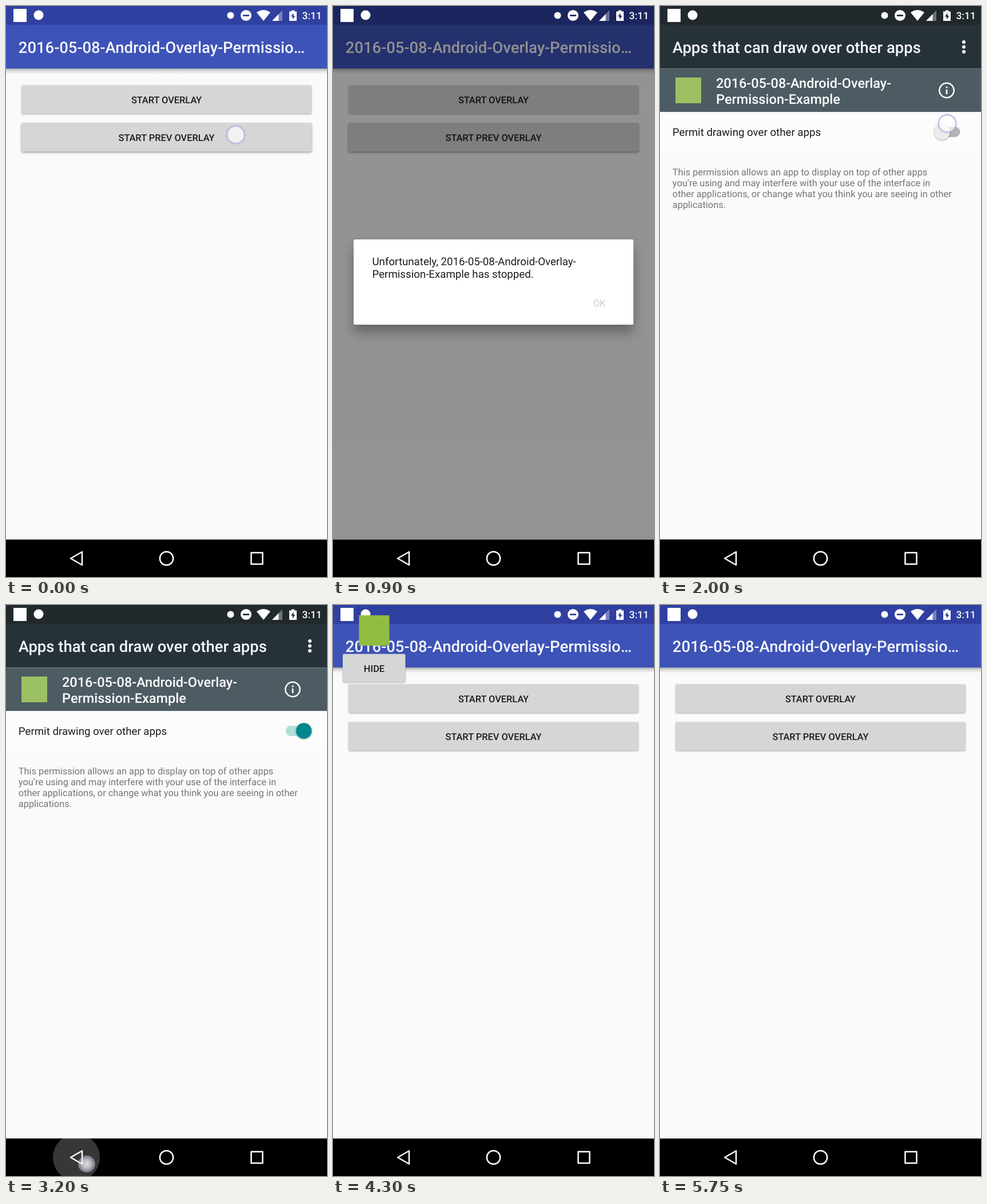
Recreate the animation shown at these times as an HTML page. Size 561 by 998 pixels, loop 5800 ms.

```html
<!DOCTYPE html>
<html lang="en">
<head>
<meta charset="utf-8">
<title>Overlay permission demo</title>
<style>
html, body { margin: 0; width: 100%; height: 100%; overflow: hidden; background: #000; }
svg { display: block; width: 561px; height: 998px; }
text { font-family: Roboto, sans-serif; white-space: pre; text-rendering: geometricPrecision; }
.title { font-size: 27.45px; font-weight: 500; fill: #f6f6fb; }
.head { font-size: 23.5px; font-weight: 500; fill: #fff; }
.label { font-size: 16.4px; font-weight: 500; fill: #1c1c1c; text-anchor: middle; }
.row { font-size: 18.7px; fill: #1d1d1d; }
.note { font-size: 16.36px; fill: #757575; }
.clock { font-size: 17.4px; font-weight: 500; fill: #fff; }
.button { fill: #d6d6d6; filter: drop-shadow(0 1px 1px rgba(0,0,0,.3)); }
.raised { fill: #d6d6d6; filter: drop-shadow(0 2px 2.5px rgba(0,0,0,.2)); }
.card { fill: #fff; filter: drop-shadow(0 14px 10px rgba(0,0,0,.3)); }
.knob { filter: drop-shadow(0 1px 1.5px rgba(0,0,0,.35)); }

/* One loop is 5.8 s, so 1% is 58 ms. */
.a { animation: 5.8s linear infinite both; }
.press { animation-name: press; }
.shade { animation-name: shade; }
.dialog { animation-name: dialog; transform-origin: 280.5px 482px; }
.settings { animation-name: settings; }
.slide { animation-name: slide; }
.on { animation-name: on; }
.ripple { animation-name: ripple; transform-origin: 123px 965.5px; }
.overlay { animation-name: overlay; }
.tap1 { animation-name: tap1; }
.tap2 { animation-name: tap2; }
.tap3 { animation-name: tap3; }
.tap4 { animation-name: tap4; }
.trail { animation-name: trail; }

@keyframes press {
  0%, 19.8% { opacity: 1; }
  19.81%, 100% { opacity: 0; }
}
@keyframes shade {
  0%, 10.3% { opacity: 0; }
  12.9%, 18.1% { opacity: .41; }
  20.3%, 26.4% { opacity: 0; }
  26.5%, 69.83% { opacity: .15; }
  72.4%, 100% { opacity: 0; }
}
@keyframes dialog {
  0%, 9.8% { opacity: 0; transform: scale(.9); }
  12.4%, 17.8% { opacity: 1; transform: none; }
  19.5%, 100% { opacity: 0; transform: none; }
}
@keyframes settings {
  0%, 24.66% { opacity: 0; transform: none; }
  26.4%, 68.8% { opacity: 1; transform: none; }
  69.83% { opacity: .8; transform: translateY(6px); }
  71.7%, 100% { opacity: 0; transform: translateY(60px); }
}
@keyframes slide {
  0%, 37.6% { transform: none; animation-timing-function: ease-in-out; }
  40.2%, 100% { transform: translateX(27.5px); }
}
@keyframes on {
  0%, 37.6% { opacity: 0; }
  40.2%, 100% { opacity: 1; }
}
@keyframes ripple {
  0%, 52.6% { opacity: 0; transform: scale(.1); }
  53.6% { opacity: .22; }
  55.17% { transform: scale(.56); }
  59.5% { transform: none; }
  62.9% { opacity: .2; }
  69.83% { opacity: .04; }
  72.4%, 100% { opacity: 0; transform: none; }
}
@keyframes overlay {
  0%, 68.1% { opacity: 0; }
  68.11%, 81.9% { opacity: 1; }
  81.91%, 100% { opacity: 0; }
}
@keyframes tap1 {
  0%, 5.2% { opacity: 1; }
  6.9%, 100% { opacity: 0; }
}
@keyframes tap2 {
  0%, 32.4% { opacity: 0; }
  33.4%, 39.7% { opacity: 1; }
  41.4%, 100% { opacity: 0; }
}
@keyframes tap3 {
  0%, 52.8% { opacity: 0; }
  53.6%, 60% { opacity: 1; }
  61.4%, 100% { opacity: 0; }
}
@keyframes tap4 {
  0%, 78.4% { opacity: 0; transform: translate(72px, 114px); }
  79.3%, 82.8% { opacity: 1; transform: translate(72px, 114px); }
  84.48% { opacity: 1; transform: translate(88px, 118px); }
  86.2%, 100% { opacity: 0; transform: translate(112px, 122px); }
}
@keyframes trail {
  0%, 83% { opacity: 0; }
  84%, 100% { opacity: .7; }
}
</style>
</head>
<body>
<svg viewBox="0 0 561 998">
  <defs>
    <linearGradient id="fall" x2="0" y2="1">
      <stop stop-opacity=".3"/>
      <stop offset=".4" stop-opacity=".12"/>
      <stop offset="1" stop-opacity="0"/>
    </linearGradient>
    <radialGradient id="halo">
      <stop offset=".74" stop-color="#8f93d0" stop-opacity="0"/>
      <stop offset=".82" stop-color="#8f93d0" stop-opacity=".35"/>
      <stop offset="1" stop-color="#8f93d0" stop-opacity="0"/>
    </radialGradient>
    <radialGradient id="glow">
      <stop stop-color="#fff" stop-opacity=".85"/>
      <stop offset=".5" stop-color="#f2f2f8" stop-opacity=".7"/>
      <stop offset="1" stop-color="#c4c6dc" stop-opacity=".45"/>
    </radialGradient>
    <clipPath id="navClip"><rect y="932.5" width="561" height="65.5"/></clipPath>
    <g id="cursor">
      <circle r="18.5" fill="url(#halo)"/>
      <circle r="15" fill="#fff" fill-opacity=".68" stroke="#b9bbe2" stroke-width="1.8"/>
    </g>
  </defs>

  <!-- Main screen -->
  <rect width="561" height="932.5" fill="#fafafa"/>
  <rect width="561" height="33" fill="#3040a0"/>
  <rect y="33" width="561" height="76.4" fill="#3d53b7"/>
  <rect y="109.4" width="561" height="10" fill="url(#fall)"/>
  <text class="title" x="21.8" y="81.7">2016-05-08-Android-Overlay-Permissio…</text>
  <rect class="button" x="27" y="138.5" width="507" height="50" rx="2.5"/>
  <rect class="button" x="27" y="204.5" width="507" height="50" rx="2.5"/>
  <rect class="raised a press" x="27" y="204.5" width="507" height="50" rx="2.5"/>
  <text class="label" x="280.5" y="170.2">START OVERLAY</text>
  <text class="label" x="280.5" y="235.8">START PREV OVERLAY</text>
  <rect class="a shade" width="561" height="932.5"/>

  <g class="a dialog">
    <rect class="card" x="36" y="408" width="489" height="149" rx="2.5"/>
    <text class="row" x="68.5" y="452.8">Unfortunately, 2016-05-08-Android-Overlay-</text>
    <text class="row" x="68.5" y="474.8">Permission-Example has stopped.</text>
    <text class="label" x="465.5" y="525" style="fill:#d6d6d6">OK</text>
  </g>

  <!-- Permission screen -->
  <g class="a settings">
    <rect width="561" height="932.5" fill="#fafafa"/>
    <rect y="932.5" width="561" height="65.5"/>
    <rect width="561" height="33" fill="#21292d"/>
    <rect y="33" width="561" height="76.4" fill="#263238"/>
    <rect y="109.4" width="561" height="76" fill="#4d5b63"/>
    <rect y="185.4" width="561" height="69.6" fill="#fcfcfc"/>
    <text class="title" x="21.8" y="81.7">Apps that can draw over other apps</text>
    <g fill="#fff">
      <circle cx="531" cy="63" r="3"/>
      <circle cx="531" cy="71.5" r="3"/>
      <circle cx="531" cy="80" r="3"/>
    </g>
    <rect x="27" y="125" width="45" height="45" fill="#9bc162"/>
    <text class="head" x="98" y="143.3">2016-05-08-Android-Overlay-</text>
    <text class="head" x="98" y="170.6">Permission-Example</text>
    <circle cx="501" cy="147.5" r="12.7" fill="none" stroke="#fff" stroke-width="2.5"/>
    <path d="M499.7 140.8h2.7v2.7h-2.7zM499.7 146h2.7v8h-2.7z" fill="#fff"/>
    <text class="row" x="21.8" y="227.3">Permit drawing over other apps</text>
    <rect x="489" y="211" width="35.5" height="18" rx="9" fill="#b3b3b3"/>
    <rect class="a on" x="489" y="211" width="35.5" height="18" rx="9" fill="#b2dfdb"/>
    <g class="a slide">
      <circle class="knob" cx="493" cy="220" r="13.8" fill="#ececec"/>
      <circle class="a on" cx="493" cy="220" r="13.8" fill="#00868c"/>
    </g>
    <text class="note" x="21.8" y="295.8">This permission allows an app to display on top of other apps</text>
    <text class="note" x="21.8" y="314.8">you’re using and may interfere with your use of the interface in</text>
    <text class="note" x="21.8" y="333.9">other applications, or change what you think you are seeing in other</text>
    <text class="note" x="21.8" y="353">applications.</text>
  </g>

  <!-- Navigation bar -->
  <g clip-path="url(#navClip)">
    <circle class="a ripple" cx="123" cy="965.5" r="73" fill="#fff"/>
  </g>
  <g fill="none" stroke="#fff" stroke-width="2.5" stroke-linejoin="round">
    <path d="M113 965.5 133 954v23z"/>
    <circle cx="280.5" cy="965.5" r="11.7"/>
    <rect x="428.5" y="955.5" width="20" height="20"/>
  </g>

  <!-- Status icons -->
  <g fill="#fff">
    <rect x="13" y="5" width="23" height="23"/>
    <circle cx="57" cy="16" r="8.5"/>
    <circle cx="392.5" cy="16.5" r="6"/>
    <path fill-rule="evenodd" d="M410 16.5a9.5 9.5 0 0 1 19 0a9.5 9.5 0 0 1-19 0zM414 15.2v2.8h11v-2.8z"/>
    <path d="M438 11.3Q450 2.5 462 11.3L450 26z"/>
    <path d="M465 26 483 7.5V26z" opacity=".35"/>
    <path d="M465 26 476.5 14.2V26z"/>
    <path fill-rule="evenodd" d="M495 9.5h3.8V7.5h5.4v2H508V26H495zM502.4 12 498 18.6h2.9v5.2l4.4-6.8h-2.9z"/>
  </g>
  <text class="clock" x="517.6" y="23">3:11</text>

  <!-- Floating overlay -->
  <g class="a overlay">
    <rect x="45.5" y="18" width="53" height="53" fill="#92bd40"/>
    <rect class="button" x="17" y="85.5" width="109.5" height="49.5" rx="2.5"/>
    <text class="label" x="72" y="116.8">HIDE</text>
  </g>

  <!-- Touches -->
  <g class="a tap1"><use href="#cursor" x="401.5" y="225"/></g>
  <g class="a tap2"><use href="#cursor" x="502" y="205.5"/></g>
  <g class="a tap3"><circle cx="141" cy="977" r="15" fill="url(#glow)"/></g>
  <g class="a tap4">
    <g class="a trail"><use href="#cursor" x="19" y="3"/></g>
    <use href="#cursor"/>
  </g>
</svg>
</body>
</html>
```
